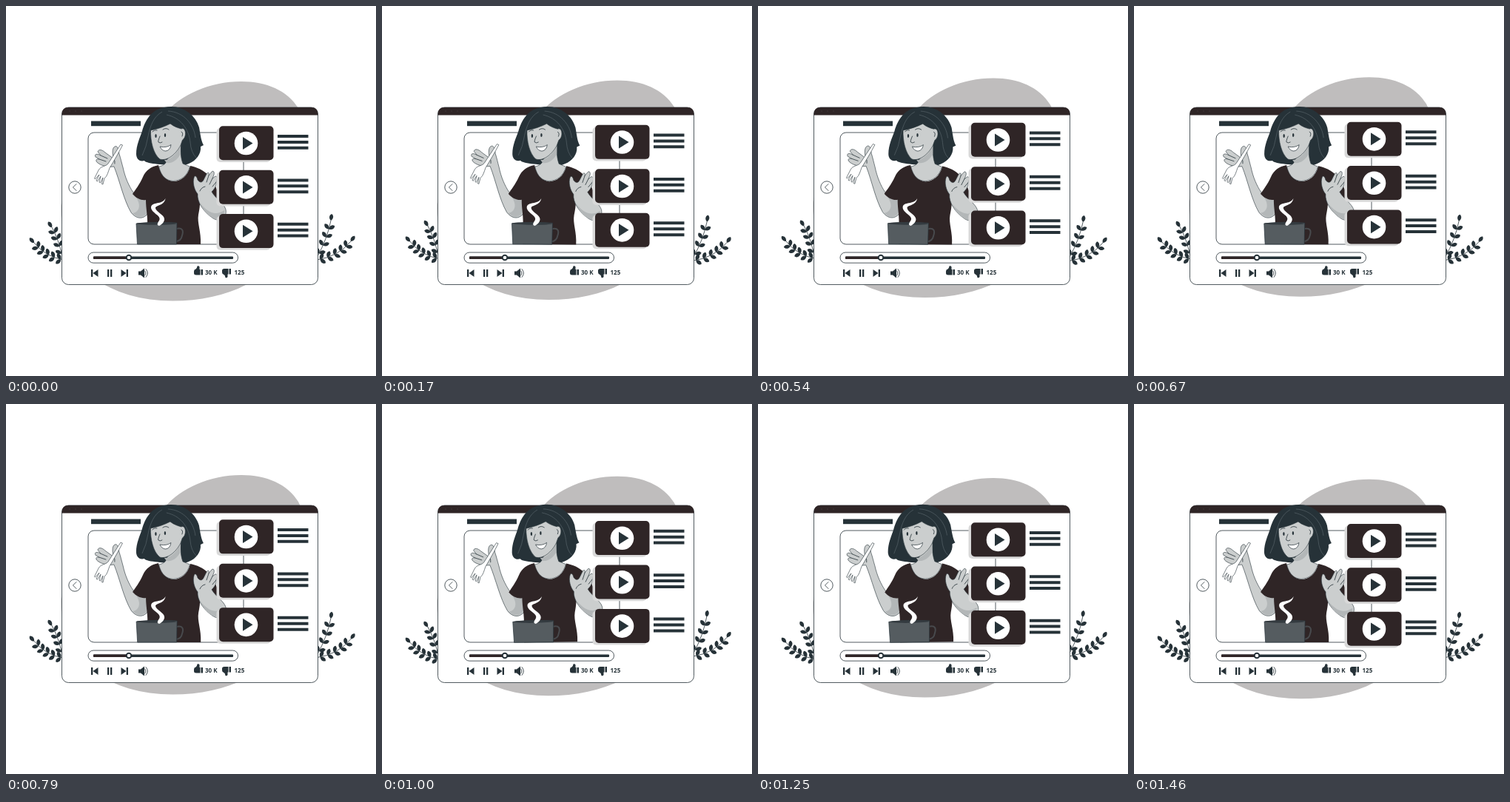
An HTML page that plays this animation: 500x500 px, repeating every 1.5 s.

```html
<!DOCTYPE html>
<html lang="en">
<head>
<meta charset="utf-8">
<title>Cooking video</title>
<style>
  html, body { margin: 0; width: 100%; height: 100%; overflow: hidden; background: #fff; }
  svg { display: block; width: 100%; height: 100%; }
  .ink { fill: #263238; }
  .dark { fill: #2f2526; }
  .line { fill: none; stroke: #263238; stroke-width: .8; stroke-linecap: round; stroke-linejoin: round; }
  .box { fill: #fff; stroke: #263238; stroke-width: .8; }
  .skin { fill: #cbcece; stroke: #263238; stroke-width: .6; stroke-linejoin: round; }
  .shade { fill: #b3b7b8; }
  text { font: 600 extra-condensed 8px "Noto Sans", sans-serif; fill: #263238; }
</style>
</head>
<body>
<svg viewBox="0 0 500 500">
  <path class="float" fill="#bfbdbd" d="M318 102C352 102 380 114 395 138C417 180 415 250 390 310C360 370 300 398.500 225 398.500C142 398.500 74 355 74.500 275C75 215 170 180 215 145C236 120 275 102 318 102Z"/>
  <g id="plants"></g>

  <g id="tablet">
    <rect class="box" x="75.500" y="137" width="346" height="239.500" rx="9"/>
    <path class="dark" d="M75.500 147.500V146Q75.500 137 84.500 137H412.500Q421.500 137 421.500 146V147.500Z"/>
    <g fill="#3b3133"><circle cx="86" cy="142" r="1"/><circle cx="94" cy="142" r="1"/><circle cx="102" cy="142" r="1"/></g>
    <rect class="ink" x="115" y="155.500" width="67" height="6.700"/>
    <rect class="box" x="111" y="171" width="210" height="151" rx="8"/>
    <circle class="box" cx="93" cy="245" r="8.200"/>
    <path class="line" d="M95 240.500L90.500 245L95 249.500"/>
    <rect class="box" x="111" y="333" width="202.500" height="14.200" rx="7.100"/>
    <rect class="ink" x="118" y="338.500" width="189" height="3.400" rx="1"/>
    <rect class="dark" x="118" y="338.500" width="48" height="3.400" rx="1"/>
    <circle cx="166" cy="340" r="3.300" fill="#fff" stroke="#263238" stroke-width="2"/>
    <path class="ink" d="M115 356h2.300v10H115zM124.500 356v10L117.500 361zM137 356h2.300v10H137zM141 356h2.300v10H141zM155.500 356v10L162.500 361zM162.700 356H165v10h-2.300zM179 358.500h3L187 354.500V367.500L182 363.500H179z"/>
    <path class="line" d="M188 358Q190 361 188 364M189 355.500Q194 361 189 366.500"/>
    <path id="thumb" class="ink" d="M254 358.500Q254 356 256.500 355.500Q258 355 258.500 351.500Q260.500 350.500 261.500 352.500V356H262.500V363.500H257Q254 363.500 254 361ZM263.500 356H266V363.500H263.500Z"/>
    <use href="#thumb" transform="matrix(1 0 0 -1 38 718.500)"/>
    <text x="269" y="363">30 K</text>
    <text x="308.500" y="363">125</text>
  </g>

  <g id="cook">
    <path class="ink" d="M214 137C236 132 256 146 261 164C263 176 264 183 267 188L263 190C264 200 257 209 247 213C240 216 234 217 228 216C218 214 190 214 187 209C180 211 176 206 176 200C176 188 181 178 184 169C188 155 196 140 214 137Z"/>
    <path class="skin" d="M146 217C138 218 129 216 124 212C120 209 122 206 126 207L121 204C119 200 123 199 128 202L124 197C125 193 130 194 134 198L145 206C144 200 143 192 147 190C151 188 152 194 153 200C155 206 156 211 158 218C161 232 166 243 172 252L191 262C193 272 193 282 188 284C183 288 175 287 169 279C159 262 154 237 146 217Z"/>
    <path class="shade" d="M172 254L190 262C192 272 192 281 187 283C183 286 177 286 171 280C180 279 185 268 172 254Z"/>
    <path class="line" stroke-width=".5" d="M126 207L135 210M128 202L137 206M145 206Q148 209 147 213"/>
    <path fill="#fff" stroke="#263238" stroke-width=".6" d="M155 187L157.500 188C152 199 146 209 140 219C138 224 137 230 133 233L131 241L129.500 240.500L131 232L127.500 239L126 238L128 230L123.500 237L122 236L126 228L120.500 234L119.500 233L125 222C128 216 135 217 138 213Z"/>
    <path class="dark" d="M206 215C196 217 189 222 185 231C180 242 175 248 171 254C176 260 183 263 189 262C189 275 192 285 191 300V322H263C264 305 258 293 260 282C262 272 263 265 261 256L286 266L290 262C285 248 282 238 274 229C266 221 258 218 249 216C246 230 236 237 226 237C216 236 209 228 206 215Z"/>
    <path class="skin" d="M218 207C217 213 212 216 206.500 217C210 231 217 236 226 236.500C236 236 245 230 248.500 217L239 213C235 202 236 190 237 180Z"/>
    <path class="shade" d="M214 208C222 208 230 201 236 189V200C231 209 224 213 217 212Z"/>
    <path class="skin" d="M195.500 168C195 182 199 200 208 207C218 210 230 200 236 188L238.500 181C245 177 243 163 237 166C233 165 227 163 222 159C214 163 206 166 195.500 168Z"/>
    <path class="line" d="M198 170Q200 167 204 168M212 167Q216 164 220 167M208 176Q205 183 206 184Q208 186 211 184M237 170Q240 171 238 176"/>
    <g class="ink"><ellipse cx="202.500" cy="175.500" rx="1.200" ry="2.500"/><ellipse cx="215" cy="174.500" rx="1.200" ry="2.500"/></g>
    <path fill="#fff" stroke="#263238" stroke-width=".7" d="M208 190Q217 192 223 187.500Q222 195 216 196Q211 196 208 190Z"/>
    <path fill="none" stroke="#69747a" stroke-width=".5" d="M217 147C236 151 247 166 249 184Q250 198 257 205M219 142C240 143 254 160 256 178M211 143C200 149 195 161 192 176Q190 190 184 202"/>
    <path class="skin" d="M259 254C254 248 252 238 254 232C255 228 258 230 259 235C262 239 265 239 267 235L271 227C273 224 275 225 274 229L278 224C280 222 282 224 281 228L279 233L283 230C286 230 286 234 284 238C285 243 281 248 278 251C283 260 295 267 297 275C299 286 290 293 280 287C266 278 258 264 259 254Z"/>
    <path class="line" stroke-width=".5" d="M274 229L271 238M279 233L275 241M284 238L279 244M262 250Q264 245 269 244"/>
    <path class="shade" d="M263 267C271 277 282 285 295 276C296 284 290 291 281 287C272 283 266 275 263 267Z"/>

    <path fill="none" stroke="#484a4d" stroke-width="2" d="M230 301C239 299 240 304 238 310C237 316 233 318 229 318"/>
    <path fill="#555c60" stroke="#263238" stroke-width=".7" d="M176 294Q203 291 231 293L230.500 322H177.500Z"/>
    <ellipse cx="203.500" cy="294" rx="27" ry="1.800" fill="#343b40"/>
    <path fill="#fff" d="M215.500 260C214 270 202 269 202 273C202 278 214 282 214 288C214 292 211 295 207 297C203 296 205 293 207 290C211 283 196 280 196 272C197 264 211 269 215.500 260Z"/>
  </g>

  <g id="cards" class="float"></g>
</svg>
<script>
const $ = id => document.getElementById(id);
const LOOP = 1500, RISE = 6.3;

// Leaves grow in pairs along a quadratic stem, with one at the tip.
function branch([x0, y0], [cx, cy], [x1, y1], pairs) {
  const bend = (a, c, b, t) => (1 - t) ** 2 * a + 2 * t * (1 - t) * c + t * t * b;
  const slope = (a, c, b, t) => (1 - t) * (c - a) + t * (b - c);
  const leaf = (x, y, angle) =>
    `<path class="ink" transform="translate(${x} ${y}) rotate(${angle})" d="M0 0C2 -3.500 7 -4 9 -.5C7 3 3 3 0 0Z"/>`;
  let out = `<path class="line" d="M${x0} ${y0}Q${cx} ${cy} ${x1} ${y1}"/>`;
  for (let i = 0; i <= pairs; i++) {
    const t = .08 + .92 * i / pairs;
    const x = bend(x0, cx, x1, t), y = bend(y0, cy, y1, t);
    const angle = Math.atan2(slope(y0, cy, y1, t), slope(x0, cx, x1, t)) * 180 / Math.PI;
    out += i < pairs ? leaf(x, y, angle - 50) + leaf(x, y, angle + 50) : leaf(x, y, angle);
  }
  return out;
}

$("plants").innerHTML =
  branch([76, 338], [71, 315], [62, 299], 4) +
  branch([78, 343], [53, 339], [38, 320], 5) +
  branch([421, 338], [434, 315], [439, 290], 4) +
  branch([420, 343], [449, 339], [466, 318], 5);

$("cards").innerHTML = [0, 59.4, 118.8].map(y => `<g transform="translate(0 ${y})">
  <rect x="284.500" y="165" width="73" height="46" rx="5" fill="#d9d9d9"/>
  <rect class="dark" x="288" y="162.300" width="73.500" height="46" rx="5"/>
  <circle cx="324.500" cy="185.500" r="15.800" fill="#fff"/>
  <path class="ink" d="M320 177V194L333.500 185.500Z"/>
  <path class="ink" d="M367 174h41.500v4H367zM367 181.900h41.500v4H367zM367 189.800h41.500v4H367z"/>
</g>`).join("");

// Triangle wave: 0 at the start, 1 halfway, 0 at the end.
const triangle = p => 1 - Math.abs(1 - 2 * (p - Math.floor(p)));

function draw(now) {
  const p = now % LOOP / LOOP;
  const lift = -RISE * triangle(p);
  const sway = 2 * triangle(p + .25) - 1;
  document.querySelectorAll(".float").forEach(el => el.setAttribute("transform", `translate(0 ${lift})`));
  $("cook").setAttribute("transform", `rotate(${sway} 208 229)`);
  $("plants").setAttribute("transform", `rotate(${sway} 251 314)`);
}

const start = performance.now();
(function tick() {
  draw(performance.now() - start);
  requestAnimationFrame(tick);
})();
</script>
</body>
</html>
```
